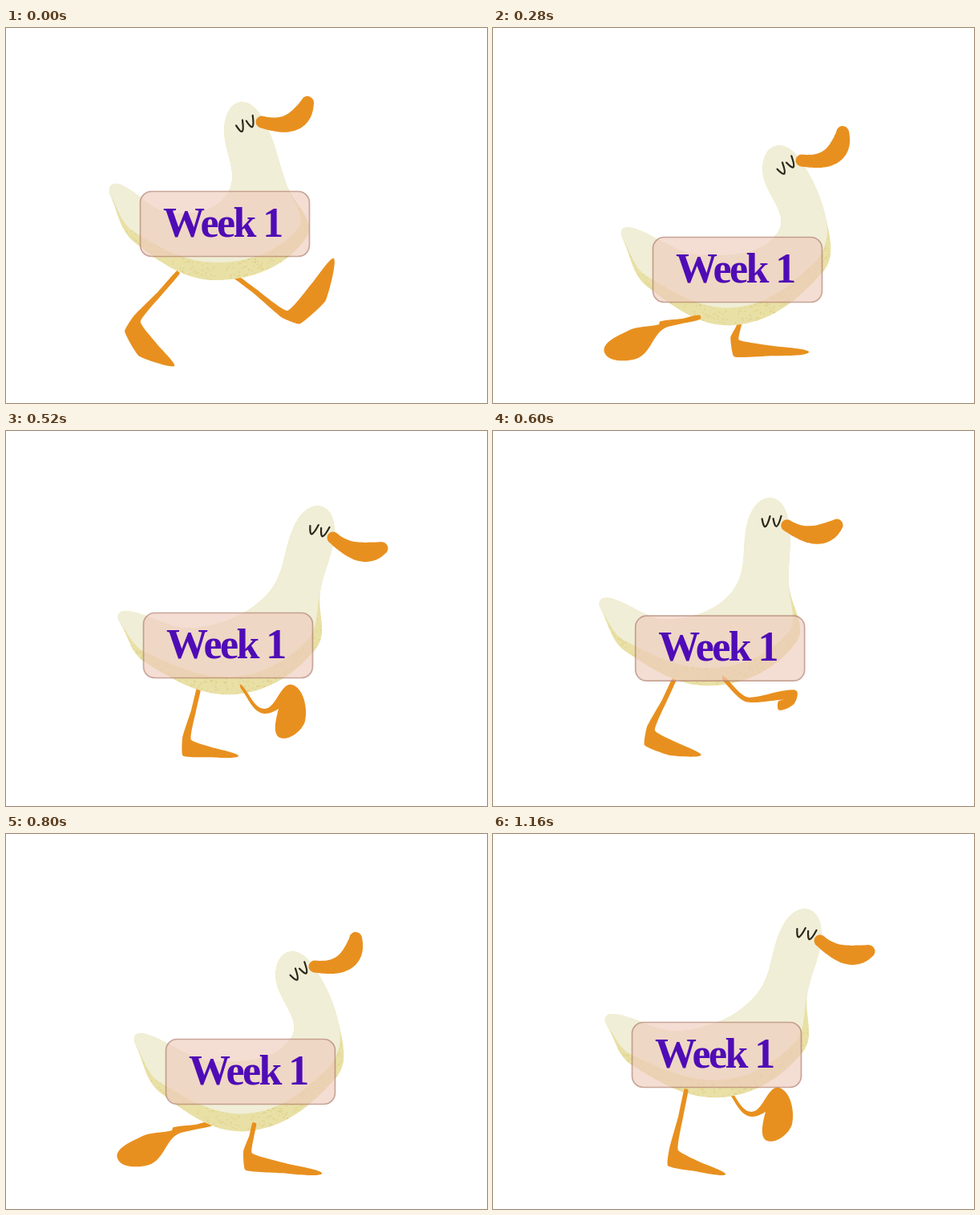
These frames come from a looping animation (600 by 467 pixels, 1.24 s). An HTML page with a canvas:

```html
<!DOCTYPE html>
<html lang="en">
<head>
<meta charset="utf-8">
<title>Walking duck</title>
<style>
  html, body { margin: 0; height: 100%; overflow: hidden; background: #fff; }
  canvas { display: block; }
</style>
</head>
<body>
<canvas id="stage" width="600" height="467"></canvas>
<script>
const ctx = document.getElementById('stage').getContext('2d');
const LOOP = 1240, TICK = 40;
const ORANGE = '#e8901f', CREAM = '#f0eed7', SHADE = '#e9e0a6';

// Points and small maths
const add = (a, b, k = 1) => [a[0] + b[0] * k, a[1] + b[1] * k];
const mix = (a, b, k) => a.map((v, i) => v + (b[i] - v) * k);
const perp = ([x, y]) => [-y, x];
const length = (a, b) => Math.hypot(b[0] - a[0], b[1] - a[1]) || 1;
const toward = (a, b) => [(b[0] - a[0]) / length(a, b), (b[1] - a[1]) / length(a, b)];
const hat = (v, from, to) => Math.max(0, Math.min(1, v - from, to - v));

// Duck poses: tail, belly, chest, throat, head, nape, then the bill's root and tilt.
const upright = [138,203, 265,314, 374,262, 350,195, 296,116, 277,205, 319,117, -.42];
const leaning = [169,257, 302,370, 412,303, 416,240, 359,170, 355,255, 385,165, -.62];
const rising = [170,269, 296,369, 412,310, 446,260, 461,213, 390,240, 472,230, .14];
const tall = [149,233, 285,328, 386,272, 392,200, 387,117, 326,203, 408,133, .2];
const poses = [upright, leaning, mix(tall, rising, 1.2), rising, tall];

// One full cycle of a leg (ankle, toe): reach, plant, roll over the foot, push off, swing forward.
const strides = [
  [348,356, 409,287], [302,387, 394,404], [285,386, 372,405], [267,383, 341,405], [226,383, 290,405],
  [164,353, 210,402], [210,371, 139,404], [195,372, 115,400], [296,370, 238,392], [360,320, 342,382]
];
const cardSpots = [
  [167,203], [199,260], [201,266], [190,256], [171,226],
  [192,243], [199,255], [196,267], [186,264], [173,234]
];
// When each of the ten poses of the two steps is reached.
const beats = [120, 280, 340, 420, 520, 720, 800, 920, 1000, 1160];

// The walk runs in ticks, with rests at the start, on the second landing and at the end.
function phaseAt(time) {
  let t = Math.floor(time / TICK) * TICK;
  if (t < 160) t = 0;
  if (t === 840) t = 800;
  const next = beats.findIndex(b => b > t);
  if (next < 0) return beats.length - 1;
  if (next === 0) return 0;
  return next - 1 + (t - beats[next - 1]) / (beats[next] - beats[next - 1]);
}

// Smooth closed curve through evenly spaced keys.
function cycle(keys, phase) {
  const i = Math.floor(phase), u = phase - i;
  const [a, b, c, d] = [-1, 0, 1, 2].map(k => keys[(i + k + keys.length) % keys.length]);
  return b.map((p, j) => p + u / 2 * (c[j] - a[j]
    + u * (2 * a[j] - 5 * p + 4 * c[j] - d[j] + u * (3 * (p - c[j]) + d[j] - a[j]))));
}

// Closed outline through points; a larger bend makes rounder corners.
function outline(pts, bend) {
  const path = new Path2D(), n = pts.length;
  path.moveTo(...pts[0]);
  pts.forEach((b, i) => {
    const a = pts[(i + n - 1) % n], c = pts[(i + 1) % n], d = pts[(i + 2) % n];
    const reach = length(b, c) * bend;
    path.bezierCurveTo(...add(b, toward(a, c), reach), ...add(c, toward(b, d), -reach), ...c);
  });
  return path;
}

// Three points round the end of a limb that comes from a given place.
function cap(center, from, radius) {
  const out = toward(from, center), side = perp(out);
  return [add(center, side, radius), add(center, out, radius), add(center, side, -radius)];
}

// The belly can be lifted, which leaves the shaded band below it.
function bodyPath(pose, lift = 0) {
  const at = i => [pose[i * 2], pose[i * 2 + 1]];
  const tail = at(0), throat = at(3), nape = at(5);
  const belly = add(at(1), [0, -lift]), chest = add(at(2), [-lift / 2, -lift / 2]);
  const under = [tail[0] + (belly[0] - tail[0]) * .18, tail[1] + (belly[1] - tail[1]) * .58];
  const back = add(mix(tail, nape, .5), [0, 27]);
  return outline([under, belly, chest, throat, ...cap(at(4), mix(throat, nape, .5), 24),
    nape, back, ...cap(tail, mix(under, back, .5), 10)], .36);
}

let seed = 7;
const random = () => (seed = seed * 16807 % 2147483647) / 2147483647;
const grain = Array.from({ length: 2600 }, () => [random() * 350, random() * 190]);

function drawBody(pose) {
  ctx.save();
  ctx.clip(bodyPath(pose));
  ctx.fillStyle = SHADE;
  ctx.fillRect(0, 0, 600, 467);
  ctx.fillStyle = 'rgba(214,198,110,.5)';
  for (const [x, y] of grain) ctx.fillRect(pose[0] - 15 + x, pose[1] + y, 1.5, 1.5);
  ctx.fillStyle = CREAM;
  ctx.fill(bodyPath(pose, 22));
  // The top of the body stays plain.
  ctx.restore();
}

// Bill and eyes share a frame at the bill's root.
function drawFace([x, y, tilt]) {
  ctx.save();
  ctx.translate(x, y);
  ctx.rotate(tilt);
  const sag = 24 - 16 * tilt;
  ctx.fillStyle = ORANGE;
  ctx.beginPath();
  for (let s = 0; s <= 1; s += .02) {
    const px = 74 * s * (1 - s) + 63 * s * s, py = 2 * s * (1 - s) * sag;
    ctx.moveTo(px, py);
    ctx.arc(px, py, 7.5 + 4.5 * Math.sin(Math.PI * s ** 1.6), 0, 7);
  }
  ctx.fill();
  ctx.strokeStyle = '#2b2619';
  ctx.lineWidth = 2.2;
  ctx.lineCap = 'round';
  for (const eye of [-26, -12]) {
    ctx.beginPath();
    ctx.moveTo(eye - 5, -9);
    ctx.quadraticCurveTo(eye - 2, 12, eye + 5, -12);
    ctx.stroke();
  }
  ctx.restore();
}

// The near leg stands lower on the stage by the given depth.
function drawLeg(phase, belly, depth) {
  const flat = hat(phase, 0, 5), limp = hat(phase, 5, 10), curl = 1 - flat - limp;
  const ground = depth * hat(phase, 0, 6);
  const [ax, ay, tx, ty] = cycle(strides, phase);
  const ankle = [ax, ay + ground / 2], toe = [tx, ty + ground];
  const hip = add(belly, [32 * Math.cos(Math.PI * phase / 5) - 18, -10]);

  const side = perp(toward(hip, ankle));
  const knee = add(mix(hip, ankle, .45), side, 30 * hat(phase, 8, 10));
  const calf = perp(toward(knee, ankle));
  const sole = perp(toward(ankle, toe));
  const foot = (along, out) => add(mix(ankle, toe, along), sole, out);
  ctx.fillStyle = ORANGE;
  ctx.fill(outline([
    add(hip, side, 2.5), add(knee, side, 3), add(ankle, calf, 6),
    foot(.03, 22 - 19 * limp), foot(.5, 13 * flat + 27 * curl + 12 * limp), toe,
    foot(.55, -24 * limp), add(ankle, calf, -5), add(knee, side, -3), add(hip, side, -2.5)
  ], .12 + .2 * limp));
}

function drawCard([x, y]) {
  ctx.beginPath();
  ctx.roundRect(x + .5, y + .5, 211, 81, 14);
  ctx.fillStyle = 'rgba(238,203,188,.66)';
  ctx.fill();
  ctx.strokeStyle = 'rgba(165,112,96,.58)';
  ctx.lineWidth = 1.7;
  ctx.stroke();
  ctx.fillStyle = '#4f0cb6';
  ctx.font = 'bold 52px "Liberation Serif", "Times New Roman", serif';
  ctx.letterSpacing = '-2.6px';
  ctx.fillText('Week 1', x + 29, y + 56.5);
}

function draw(time) {
  const phase = phaseAt(time);
  const pose = cycle(poses, phase % 5), belly = pose.slice(2, 4);
  ctx.clearRect(0, 0, 600, 467);
  drawLeg(phase, belly, 0);
  drawBody(pose);
  drawFace(pose.slice(12));
  drawLeg((phase + 5) % 10, belly, 19);
  drawCard(cycle(cardSpots, phase));
}

const start = performance.now();
function loop() {
  draw((performance.now() - start) % LOOP);
  requestAnimationFrame(loop);
}
loop();
</script>
</body>
</html>
```
